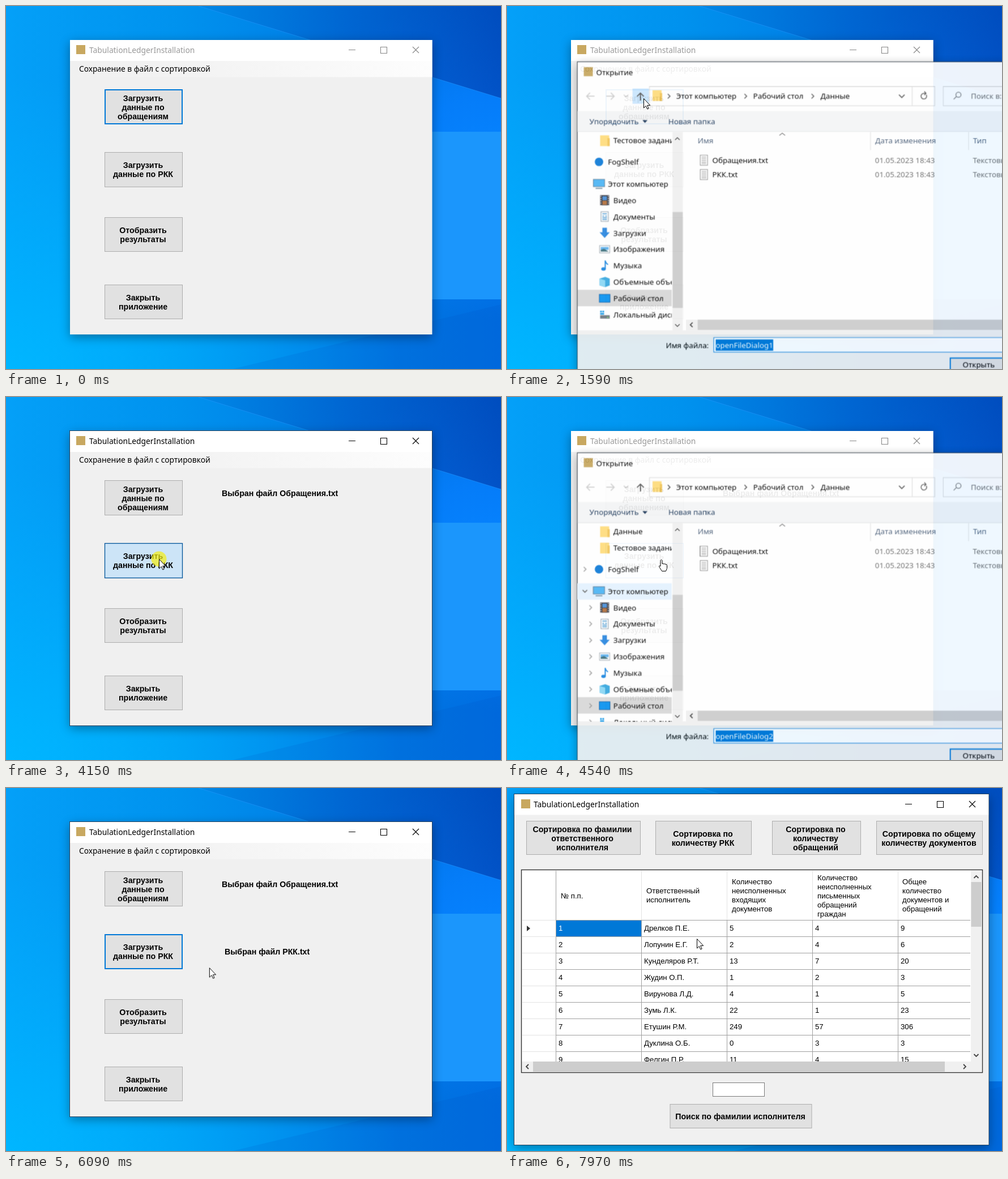
Animation, 874 px wide and 641 px high, one loop 8000 ms. Source, as an HTML page:

```html
<!DOCTYPE html>
<html lang="ru">
<head>
<meta charset="utf-8">
<title>Отчёт</title>
<style>
html, body { margin: 0; width: 100%; height: 100%; overflow: hidden; background: #0082e0; }
svg { display: block; width: 874px; height: 641px; }
text { font: 13.4px "Noto Sans", sans-serif; fill: #000; white-space: pre; }
.title { font-size: 13.8px; }
.menu { font-size: 13.7px; }
.bold { font: bold 14.2px "Liberation Sans", sans-serif; }
.mid { text-anchor: middle; }
.grid { font: 13.2px "Liberation Sans", sans-serif; }
.dim { fill: #6d6d6d; }
.off { fill: #999; }
.head { fill: #4c607a; }
.tool { fill: #1e395b; }
.inv { fill: #fff; }
.line { fill: none; }
.shade { filter: drop-shadow(0 5px 9px rgba(0, 0, 0, .36)); }
#d1, #d2 { transform-origin: 470px 310px; }
#res { transform-origin: 432px 320px; }
</style>
</head>
<body>
<script>
const LOOP = 8000;
const APP = 'TabulationLedgerInstallation';
const rules = [];
const pct = ms => (ms / LOOP * 100).toFixed(4) + '%';

function animate(id, frames, timing) {
  const body = frames.map(([ms, css]) => `${pct(ms)}{${css}}`).join('');
  rules.push(`@keyframes ${id}{${body}}#${id}{animation:${id} ${LOOP}ms ${timing} infinite}`);
}

// Hidden at first, then toggled at each given time
function show(id, ...times) {
  animate(id, [[0, 'opacity:0'], ...times.map((ms, i) => [ms, `opacity:${i % 2 ? 0 : 1}`])], 'step-end');
}

// Window opening and closing
function pop(id, open, close) {
  const pose = (o, s) => `opacity:${o};transform:scale(${s})`;
  const frames = [[0, pose(0, .93)], [open, pose(0, .93)], [open + 40, pose(.45, .965)],
    [open + 110, pose(.93, .9955)], [open + 180, pose(1, 1)]];
  if (close) frames.push([close, pose(1, 1)], [close + 150, pose(0, .95)], [LOOP, pose(0, .93)]);
  else frames.push([LOOP, pose(1, 1)]);
  animate(id, frames, 'linear');
}

const rect = (x, y, w, h, fill, more = '') =>
  `<rect x="${x}" y="${y}" width="${w}" height="${h}" fill="${fill}" ${more}/>`;
const box = (x, y, w, h, fill, stroke, sw = 1, more = '') =>
  rect(x, y, w, h, fill, `stroke="${stroke}" stroke-width="${sw}" ${more}`);
const text = (x, y, s, cls = '') => `<text x="${x}" y="${y}" class="${cls}">${s}</text>`;
const lines = (x, y, s, cls, step = 16) =>
  s.split('|').map((part, i) => text(x, y + i * step, part, cls)).join('');
const path = (d, stroke, w = 1, more = '') =>
  `<path class="line" d="${d}" stroke="${stroke}" stroke-width="${w}" ${more}/>`;
const solid = (d, fill, more = '') => `<path d="${d}" fill="${fill}" ${more}/>`;
const group = (id, ...parts) => `<g id="${id}">${parts.join('')}</g>`;
const at = (x, y, s) => `<g transform="translate(${x} ${y})">${s}</g>`;
const chev = (x, y, turn, color = '#555', w = 1.5) =>
  path('M-2-4 2 0-2 4', color, w, `transform="translate(${x} ${y}) rotate(${turn})"`);

const appIcon = (x, y) => rect(x, y, 16, 16, '#c8a860');
const controls = (x, y, c) => path(
  `M${x} ${y}.5h12M${x + 56.5} ${y - 4.5}h11v11h-11zM${x + 113} ${y - 5}l11 11m0-11l-11 11`, c, 1.1);

function wallpaper() {
  const stops = (...cs) => cs.map(([o, c, a = 1]) =>
    `<stop offset="${o}" stop-color="${c}" stop-opacity="${a}"/>`).join('');
  return `<defs>
    <linearGradient id="sky">${stops([0, '#04a0f8'], [.35, '#0092ee'], [.7, '#007ae4'], [1, '#006ce0'])}</linearGradient>
    <radialGradient id="low" cx="0" cy="1" r=".8">${stops([0, '#00b6ff'], [1, '#00b0ff', 0])}</radialGradient>
    <radialGradient id="glow" cx="1" cy=".42" r=".45">${stops([0, '#0684ff'], [.4, '#0680ff', .8], [1, '#0680f8', 0])}</radialGradient>
    <linearGradient id="dusk">${stops([0, '#0050b8', .12], [.5, '#0044b4', .38], [1, '#003cac', .66])}</linearGradient>
    <linearGradient id="strip">${stops([0, '#f0f0f0'], [.35, '#f3f3f3'], [1, '#fdfdfd'])}</linearGradient>
    <clipPath id="tree">${rect(123, 222, 167, 352, '#000')}</clipPath>
    <clipPath id="cells">${rect(26, 146, 792, 337, '#000')}</clipPath></defs>` +
    ['sky', 'low', 'glow'].map(id => rect(0, 0, 874, 641, `url(#${id})`)).join('') +
    solid('M340 0L874 163V0z', 'url(#dusk)') +
    path('M340 0L874 163', '#2a9cff', 1, 'opacity=".5"') +
    solid('M874 527L400 641H874z', '#0050c0', 'opacity=".14"') +
    rect(578, 222, 296, 296, '#1b96fc');
}

function button(x, y, w, h, label, base, id = '', cx = x + w / 2) {
  const states = id && [
    group(id + 'f', box(x + .5, y + .5, w - 1, h - 1, '#e1e1e1', '#0078d7', 2)),
    group(id + 'h', box(x, y, w, h, '#e5f1fb', '#0078d7')),
    group(id + 'p', box(x, y, w, h, '#cce4f7', '#005499', 1.3))].join('');
  return box(x, y, w, h, '#e1e1e1', '#adadad') + states + lines(cx, base, label, 'bold mid');
}

function mainWindow() {
  const caption = (id, c, cls) => group(id, text(147, 83, APP, 'title ' + cls), controls(605, 77, c));
  return rect(113, 60, 639.5, 520, '#f0f0f0', 'class="shade"') +
    rect(113, 60, 639.5, 37, '#fff') + rect(113, 97, 639.5, 28.5, 'url(#strip)') +
    appIcon(124, 69) + caption('idle', '#888', 'off') + caption('live', '#000', '') +
    group('edge', box(112.5, 59.5, 640, 521, 'none', '#24425e')) +
    text(129, 116, 'Сохранение в файл с сортировкой', 'menu') +
    button(174.5, 147.5, 137, 61, 'Загрузить|данные по|обращениям', 168, 'b1', 242) +
    button(174.5, 258.5, 137, 61, 'Загрузить|данные по РКК', 286, 'b2', 242) +
    button(174.5, 373.5, 137, 60, 'Отобразить|результаты', 401, 'b3', 242) +
    button(174.5, 492.5, 137, 60, 'Закрыть|приложение', 520, '', 242) +
    group('l1', text(381, 175, 'Выбран файл Обращения.txt', 'bold')) +
    group('l2', text(386, 294, 'Выбран файл РКК.txt', 'bold'));
}

const icons = {
  folder: rect(-8, -9, 16, 19, '#ffdd7d') + rect(5, -4, 4, 14, '#f3c65a'),
  cloud: '<circle r="7.5" fill="#0f7bd8"/>',
  pc: box(-10, -8, 20, 13, '#4db5f5', '#5a7a94') + rect(-6, 7, 12, 2, '#7f97a8'),
  video: rect(-8, -9, 16, 18, '#3b3b44') + rect(-4, -7, 8, 7, '#4a90d9') + rect(-4, 1, 8, 7, '#b5713c') +
    path('M-6.5-8v17M6.5-8v17', '#ddd', 1.5, 'stroke-dasharray="2"'),
  doc: box(-6.5, -8.5, 13, 17, '#fff', '#8a9aa8') + path('M-4-5h8M-4-1h3M1-1h3M-4 2h8M-4 5h8', '#3f94d0', 1.5),
  down: solid('M-4-9h8v8h5l-9 10-9-10h5z', '#2b88e0'),
  image: box(-9, -6.5, 18, 13, '#fff', '#9aa5ae') + rect(-7, -4, 14, 5, '#5fb2ee') + solid('M-7 4V1l6-2 8 5z', '#3c6f7c'),
  music: '<ellipse cx="-2" cy="6" rx="4" ry="3" fill="#1a86e0"/>' + path('M1 6V-9q1 5 5 7', '#1a86e0', 2),
  cube: solid('M-9-6L1-9 9-6V6L1 9-9 6z', '#39a9e0') + solid('M-9-6L1-3V9l-10-3z', '#8ad8f5'),
  desk: box(-9.5, -7, 19, 14, '#0a93f0', '#0a5ca8'),
  disk: rect(-8, 1, 17, 6, '#6e7880') + rect(-8, -7, 3, 3, '#1a9be8') + rect(-4, -7, 3, 3, '#1a9be8') +
    rect(-8, -3, 7, 3, '#1a9be8') + rect(4, 4, 3, 1.5, '#7fe070')
};

function tree(n) {
  const kids = ['Видео:video', 'Документы:doc', 'Загрузки:down', 'Изображения:image', 'Музыка:music',
    'Объемные объекты:cube', 'Рабочий стол:desk', 'Локальный диск:disk'];
  const row = (y, s, icon, top) => at(top ? 161 : 171, y, icons[icon]) + text(top ? 177 : 186.5, y + 5, s);
  const shift = n === 2 ? 29 : 0;
  const open = n === 2 ? group('arrows', rect(123, 300, 167, 29, '#e5f3ff'),
    chev(136, 275, 0, '#999'), chev(136, 314, 90), kids.map((_, i) => chev(146, 343 + i * 29, 0, '#999')).join('')) : '';
  return `<g clip-path="url(#tree)">${at(0, shift, rect(123, 502, 167, 29, '#d9d9d9') + open +
    row(208, 'Данные', 'folder') + row(237, 'Тестовое задание', 'folder') +
    row(275, 'FogShelf', 'cloud', 1) + row(314, 'Этот компьютер', 'pc', 1) +
    kids.map((k, i) => row(343 + i * 29, ...k.split(':'))).join(''))}</g>` +
    rect(291.5, 222, 18, 352, '#f0f0f0') + rect(291.5, 364 - shift / 2, 18, 170, '#cdcdcd') +
    chev(300, 234, -90) + chev(300, 565, 90);
}

function dialog(n) {
  const picked = n === 1 ? 'Обращения.txt' : 'РКК.txt';
  const mark = (id, y, fill, edge) => group(id + n, box(332.5, y, 560, 26, fill, edge));
  const file = (y, s) => at(347, y, box(-6.5, -9, 13, 18, '#fff', '#8c8c8c') +
    path('M-4-5.5h8M-4-2.5h8M-4 .5h8M-4 3.5h8M-4 6h8', '#9a9a9a')) +
    text(362, y + 5, s) + text(650.5, y + 5, '01.05.2023 18:43', 'dim') + text(824, y + 5, 'Текстовый документ', 'dim');
  const chosenRow = n === 1 ? 260.5 : 285.5;
  return group('d' + n,
    box(122.5, 97.5, 900, 640, '#fff', '#26323c', 1, 'class="shade"'),
    appIcon(134, 107), text(156, 121, 'Открытие'),
    n === 1 ? group('up', rect(220.5, 145, 29, 27, '#cce8ff')) : '',
    path('M153 158.5h-14m6-6l-6 6 6 6M174 158.5h14m-6-6l6 6-6 6', '#cfcfcf', 1.6),
    chev(209, 158, 90, '#cfcfcf'), path('M234.5 166v-13m-6 6l6-6 6 6', '#555', 1.8),
    box(250.5, 141.5, 506, 34, '#fff', '#d9d9d9'), path('M716.5 142v33', '#d9d9d9'),
    at(264, 157, icons.folder),
    [285, 421, 540].map(x => chev(x, 158.5, 0)).join(''),
    text(298, 163, 'Этот компьютер'), text(434.5, 163, 'Рабочий стол'), text(554, 163, 'Данные'),
    path('M693 156l5 5 5-5', '#555', 1.6),
    path('M741.5 156a5 5 0 1 1-4-2.5h3M738 150l3 3.5-3 3', '#555', 1.4),
    box(771.5, 141.5, 200, 34, '#fff', '#d9d9d9'),
    path('M795 159l-5 5M794 156a4.5 4.5 0 1 1 9 0a4.5 4.5 0 1 1-9 0', '#777', 1.3),
    text(820.5, 163, 'Поиск в: Данные', 'dim'),
    rect(123, 185, 800, 37, '#f5f6f7'), path('M123 221.5h800', '#e4e6e8'),
    text(144, 208, 'Упорядочить', 'tool'), solid('M238 201h9l-4.5 5z', '#1e395b'),
    text(284, 208, 'Новая папка', 'tool'),
    tree(n),
    path('M481 228l5-4 5 4', '#777', 1.2), path('M642.5 222v32M816.5 222v32', '#e2e2e2'),
    text(336, 242, 'Имя', 'head'), text(651, 242, 'Дата изменения', 'head'), text(824.5, 242, 'Тип', 'head'),
    n === 2 ? mark('pass', 260.5, '#e5f3ff', '#e5f3ff') : '',
    mark('over', chosenRow, '#e5f3ff', '#e5f3ff'), mark('sel', chosenRow, '#cce8ff', '#99d1ff'),
    file(272, 'Обращения.txt'), file(297.5, 'РКК.txt'),
    rect(315, 555, 600, 19, '#f0f0f0'), rect(336, 555, 600, 18, '#cdcdcd'), chev(325, 564, 180, '#444', 1.8),
    rect(123, 574, 800, 160, '#f0f0f0'), text(279.5, 605, 'Имя файла:'),
    box(364.5, 586.5, 560, 26, '#fff', '#0078d7'),
    group('ask' + n, rect(368, 590, 102, 20, '#0078d7'), text(368, 605.5, 'openFileDialog' + n, 'inv')),
    group('got' + n, text(369, 605.5, picked), path('M369.5 591v18', '#000')),
    box(784, 623, 120, 40, '#e1e1e1', '#0078d7', 2), text(806, 640, 'Открыть'));
}

function results() {
  const people = [
    ['Дрелков П.Е.', 5, 4], ['Лопунин Е.Г.', 2, 4], ['Кунделяров Р.Т.', 13, 7], ['Жудин О.П.', 1, 2],
    ['Вирунова Л.Д.', 4, 1], ['Зумь Л.К.', 22, 1], ['Етушин Р.М.', 249, 57], ['Дуклина О.Б.', 0, 3], ['Фелгин П.Р.', 11, 4]];
  const cols = [86.5, 237.5, 388.5, 539.5, 690.5];
  const rows = people.map(([name, a, b], i) => {
    const y = 233.5 + i * 29;
    return path(`M27 ${y}h59`, '#e3e3e3') + path(`M86 ${y}h733`, '#a0a0a0') +
      [i + 1, name, a, b, a + b].map((s, k) =>
        text(cols[k] + 4.5, y + 18.5, s, i + k ? 'grid' : 'grid inv')).join('');
  }).join('');
  const heads = [[95, 195, '№ п.п.'], [246, 186, 'Ответственный|исполнитель'],
    [397, 170, 'Количество|неисполненных|входящих|документов'],
    [548, 163, 'Количество|неисполненных|письменных|обращений|граждан'],
    [698, 170, 'Общее|количество|документов и|обращений']];
  return group('res',
    rect(13, 11, 838, 619, '#f0f0f0', 'class="shade"'), rect(13, 11, 838, 36.5, '#fff'),
    box(12.5, 10.5, 838.5, 620, 'none', '#24425e'),
    appIcon(25, 20), text(47, 34, APP, 'title'), controls(703, 28, '#000'),
    button(34.5, 58.5, 201, 59, 'Сортировка по фамилии|ответственного|исполнителя', 78, '', 133),
    button(262.5, 58.5, 169, 59, 'Сортировка по|количеству РКК', 86, '', 346),
    button(468.5, 58.5, 156, 59, 'Сортировка по|количеству|обращений', 78, '', 545),
    button(652.5, 58.5, 187, 59, 'Сортировка по общему|количеству документов', 86, '', 745),
    rect(25, 145, 814, 357, '#fff'),
    '<g clip-path="url(#cells)">', path(cols.map(x => `M${x} 146v87`).join(''), '#e3e3e3'),
    path(cols.map(x => `M${x} 233v260`).join(''), '#a0a0a0'), path('M86.5 146v87', '#a0a0a0'),
    rect(87, 234, 150, 28, '#0078d7'), rows,
    heads.map(([x, y, s]) => lines(x, y, s, 'grid')).join(''), '</g>',
    solid('M35 243v10l6-5z', '#333'),
    rect(819, 146, 19, 337, '#f0f0f0'), rect(819.5, 166, 18, 79, '#cdcdcd'),
    chev(828.5, 157, -90, '#444', 1.8), chev(828.5, 472, 90, '#444', 1.8),
    rect(26, 483, 812, 18, '#f0f0f0'), rect(46, 483, 727, 18, '#cdcdcd'),
    chev(36, 492, 180, '#444', 1.8), chev(808, 492, 0, '#444', 1.8),
    box(25.5, 144.5, 814, 358, 'none', '#333', 1.4),
    box(363.5, 520.5, 91, 24, '#fff', '#7a7a7a'),
    button(288, 558.5, 250, 42, 'Поиск по фамилии исполнителя', 585, '', 412));
}

function cursor() {
  const arrow = 'M.5.5v16.5l3.8-3.6 2.5 5.6 2.4-1-2.5-5.600h5z';
  const hand = 'M1 2.5q1.5-3 3 0v6q1-1 3 .5 1.5-1 3 .5 2.5-.5 2.5 2v5l-2 5h-7l-5-8q-.5-2.5 2.5-.5z';
  const pen = 'stroke="#000"';
  return group('mouse', group('cur',
    group('click', '<circle r="13.5" fill="#f4ee14" opacity=".7"/>'),
    group('arrow', solid(arrow, '#fff', pen)), group('hand', solid(hand, '#fff', pen))));
}

document.body.innerHTML = `<svg viewBox="0 0 874 641">${
  wallpaper() + mainWindow() + dialog(1) + dialog(2) + results() + cursor()}</svg>`;

// Main window
show('live', 1200, 1480, 2900, 4430, 5600);
show('edge', 1200, 1480, 2900, 4430, 5600);
show('idle', 0, 1200, 1480, 2900, 4430, 5600);
show('b1f', 0, 950, 1500, 4150);
show('b1h', 950, 1200, 1400, 1500);
show('b1p', 1200, 1400);
show('b2f', 4600, 6790);
show('b2h', 3500, 4150, 4360, 4600);
show('b2p', 4150, 4360);
show('b3f', 6950);
show('b3h', 6380, 6790);
show('b3p', 6790, 6950);
show('l1', 2850);
show('l2', 5600);

// Dialogs
pop('d1', 1480, 2900);
show('up', 1480, 1760);
show('over1', 2090, 2230);
show('sel1', 2230);
show('ask1', 0, 2420);
show('got1', 2420);
pop('d2', 4430, 5600);
animate('arrows', [[0, 'opacity:1'], [4980, 'opacity:1'], [5250, 'opacity:0'], [LOOP, 'opacity:0']], 'linear');
show('pass2', 4980, 5120);
show('over2', 5120, 5450);
show('sel2', 5450);
show('ask2', 0, 5500);
show('got2', 5500);
pop('res', 6960);

// Pointer
show('mouse', 360);
show('click', 1200, 1400, 2230, 2300, 2870, 2930, 4150, 4360, 5450, 5510, 6790, 6950);
show('arrow', 0, 4470, 4740);
show('hand', 4470, 4740);
animate('cur', [
  [0, 654, 468], [360, 654, 468], [500, 450, 320], [680, 450, 320], [1050, 241, 163], [1660, 241, 163],
  [2200, 385, 275], [3040, 385, 275], [3580, 299, 284], [3650, 299, 284], [3840, 270, 286], [4650, 270, 286],
  [5240, 395, 298], [6089, 395, 298], [6090, 359, 317], [6530, 258, 402], [7969, 258, 402], [7970, 335, 266], [LOOP, 335, 266]
].map(([ms, x, y]) => [ms, `transform:translate(${x}px,${y}px)`]), 'linear');

const sheet = document.createElement('style');
sheet.textContent = rules.join('\n');
document.head.append(sheet);
</script>
</body>
</html>
```
